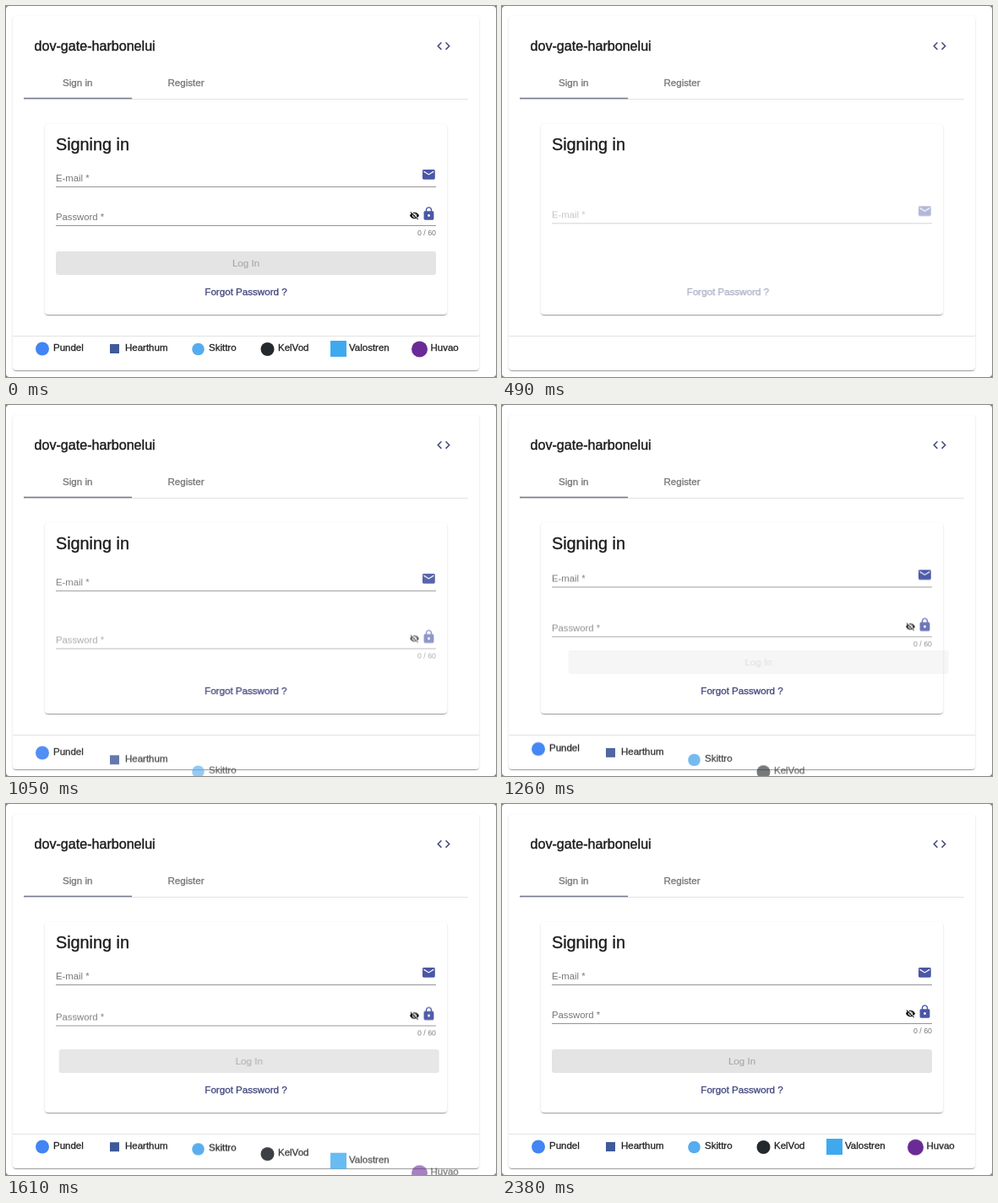
An HTML page that plays this animation: 580 px wide and 440 px high, repeating every 2450 ms.

```html
<!DOCTYPE html>
<html lang="en">
<head>
<meta charset="utf-8">
<title>Sign in</title>
<style>
  html, body { margin: 0; width: 580px; height: 440px; overflow: hidden; }
  html { background: #777; }
  body { position: relative; background: #fff; border-radius: 4px; }
  .card {
    position: absolute; background: #fff; border-radius: 4px;
    box-shadow: 0 2px 1px -1px rgba(0,0,0,.2), 0 1px 1px rgba(0,0,0,.14), 0 1px 3px rgba(0,0,0,.12);
  }
  .outer { left: 8px; top: 12px; width: 552px; height: 420px; }
  .inner { left: 46px; top: 140px; width: 476px; height: 226px; }
  svg { position: absolute; left: 0; top: 0; }
  text { font: 11.3px "Liberation Sans", Arial, sans-serif; fill: #767676; }
  .medium { font-size: 11.6px; stroke: currentColor; stroke-width: .3px; fill: currentColor; }
  .title { font-size: 16.1px; color: #1c1c1c; stroke-width: .4px; }
  .heading { font-size: 19.8px; color: #1c1c1c; stroke-width: .35px; }
  .tab { color: #757575; }
  .link { color: #41467e; }
  .off { color: #a8a8a8; stroke-width: .15px; }
  .label { font-size: 11.5px; color: #222; }
  .count { font-size: 8.8px; }
  .mid { text-anchor: middle; }
  .end { text-anchor: end; }
  .icon { fill: #4a57a6; }
</style>
</head>
<body>
<div class="card outer"></div>
<div class="card inner"></div>
<svg width="580" height="440" viewBox="0 0 580 440">
  <text class="medium title" x="33.5" y="53">dov-gate-harbonelui</text>
  <path fill="#474c82" transform="translate(508.6 38.1) scale(.78)" d="M9.4 16.6 4.8 12l4.6-4.6L8 6l-6 6 6 6zM14.6 16.6l4.6-4.6-4.6-4.6L16 6l6 6-6 6z"/>

  <text class="medium tab mid" x="84.7" y="95">Sign in</text>
  <text class="medium tab mid" x="213" y="95">Register</text>
  <path fill="#e2e2e2" d="M21 110h526v1H21z"/>
  <path fill="#77798f" d="M21 108.7h128v1.6H21z"/>

  <text class="medium heading" x="59" y="171">Signing in</text>
  <path fill="#e3e3e3" d="M8 391h552v1H8z"/>

  <g data-start="308">
    <text x="59" y="208">E-mail *</text>
    <path fill="#949494" d="M59 214h450v1H59z"/>
    <path class="icon" transform="translate(491.5 191) scale(.74)" d="M20 4H4c-1.1 0-2 .9-2 2v12c0 1.1.9 2 2 2h16c1.1 0 2-.9 2-2V6c0-1.1-.9-2-2-2zm0 4l-8 5-8-5V6l8 5 8-5z"/>
  </g>

  <g data-start="722">
    <text x="59" y="254">Password *</text>
    <path fill="#949494" d="M59 260h450v1H59z"/>
    <path fill="#111" transform="translate(477.5 242.5) scale(.5)" d="M12 7c2.76 0 5 2.24 5 5 0 .65-.13 1.26-.36 1.83l2.92 2.92c1.51-1.26 2.7-2.89 3.43-4.75-1.73-4.39-6-7.5-11-7.5-1.4 0-2.74.25-3.98.7l2.16 2.16C10.74 7.13 11.35 7 12 7zM2 4.27l2.74 2.74C3.08 8.3 1.78 10.02 1 12c1.73 4.39 6 7.5 11 7.5 1.55 0 3.03-.3 4.38-.84L19.73 22 21 20.73 3.27 3zM7.53 9.8l1.55 1.55c-.05.21-.08.43-.08.65 0 1.66 1.34 3 3 3 .22 0 .44-.03.65-.08l1.55 1.55c-.67.33-1.41.53-2.2.53-2.76 0-5-2.24-5-5 0-.79.2-1.53.53-2.2zm4.31-.78l3.15 3.15.02-.16c0-1.66-1.34-3-3-3z"/>
    <path class="icon" transform="translate(491.6 237.4) scale(.74)" d="M18 8h-1V6c0-2.76-2.24-5-5-5S7 3.24 7 6v2H6c-1.1 0-2 .9-2 2v10c0 1.1.9 2 2 2h12c1.1 0 2-.9 2-2V10c0-1.1-.9-2-2-2zm-6 9c-1.1 0-2-.9-2-2s.9-2 2-2 2 .9 2 2-.9 2-2 2zm3.1-9H8.9V6c0-1.71 1.39-3.1 3.1-3.1s3.1 1.39 3.1 3.1z"/>
    <text class="count end" x="509" y="272">0 / 60</text>
  </g>

  <g data-start="1165" data-x="30">
    <rect x="59" y="291" width="450" height="28" rx="3" fill="#e4e4e4"/>
    <text class="medium off mid" x="284" y="309">Log In</text>
  </g>

  <g data-start="355" data-x="-30">
    <text class="medium link mid" x="284" y="343">Forgot Password ?</text>
  </g>

  <g data-start="308">
    <circle cx="43" cy="406.5" r="8" fill="#4285f4"/>
    <text class="medium label" x="56" y="409">Pundel</text>
  </g>
  <g data-start="512">
    <rect x="123" y="401" width="11" height="11" fill="#3f5a9a"/>
    <text class="medium label" x="141" y="409">Hearthum</text>
  </g>
  <g data-start="714">
    <circle cx="227.5" cy="407" r="7.3" fill="#55acee"/>
    <text class="medium label" x="240" y="409">Skittro</text>
  </g>
  <g data-start="930">
    <circle cx="309.5" cy="407" r="8" fill="#24292e"/>
    <text class="medium label" x="322" y="409">KelVod</text>
  </g>
  <g data-start="1115">
    <rect x="384" y="397" width="19" height="19" fill="#3fa9ee"/>
    <text class="medium label" x="406" y="409">Valostren</text>
  </g>
  <g data-start="1318">
    <circle cx="489.5" cy="407" r="9.5" fill="#6a2b96"/>
    <text class="medium label" x="502.5" y="409">Huvao</text>
  </g>
</svg>
<script>
  const LOOP = 2450, CUT = 70;
  const shown = { opacity: 1, transform: 'translate(0px, 0px)' };

  // Hidden at CUT, then eased in from below (or from the side when data-x is set).
  function enter(el) {
    const start = +el.dataset.start, x = +(el.dataset.x || 0);
    const end = Math.min(start + (x ? 800 : 1170), LOOP);
    const away = { opacity: 0, transform: `translate(${x}px, ${x ? 0 : 75}px)` };
    const at = (ms, pose, easing = 'linear') => ({ ...pose, easing, offset: ms / LOOP });
    const frames = [
      at(0, shown), at(CUT, shown), at(CUT, away),
      at(start, away, 'cubic-bezier(0, 0, .2, 1)'), at(end, shown)
    ];
    if (end < LOOP) frames.push(at(LOOP, shown));
    el.animate(frames, { duration: LOOP, iterations: Infinity });
  }

  document.querySelectorAll('[data-start]').forEach(enter);
</script>
</body>
</html>
```
